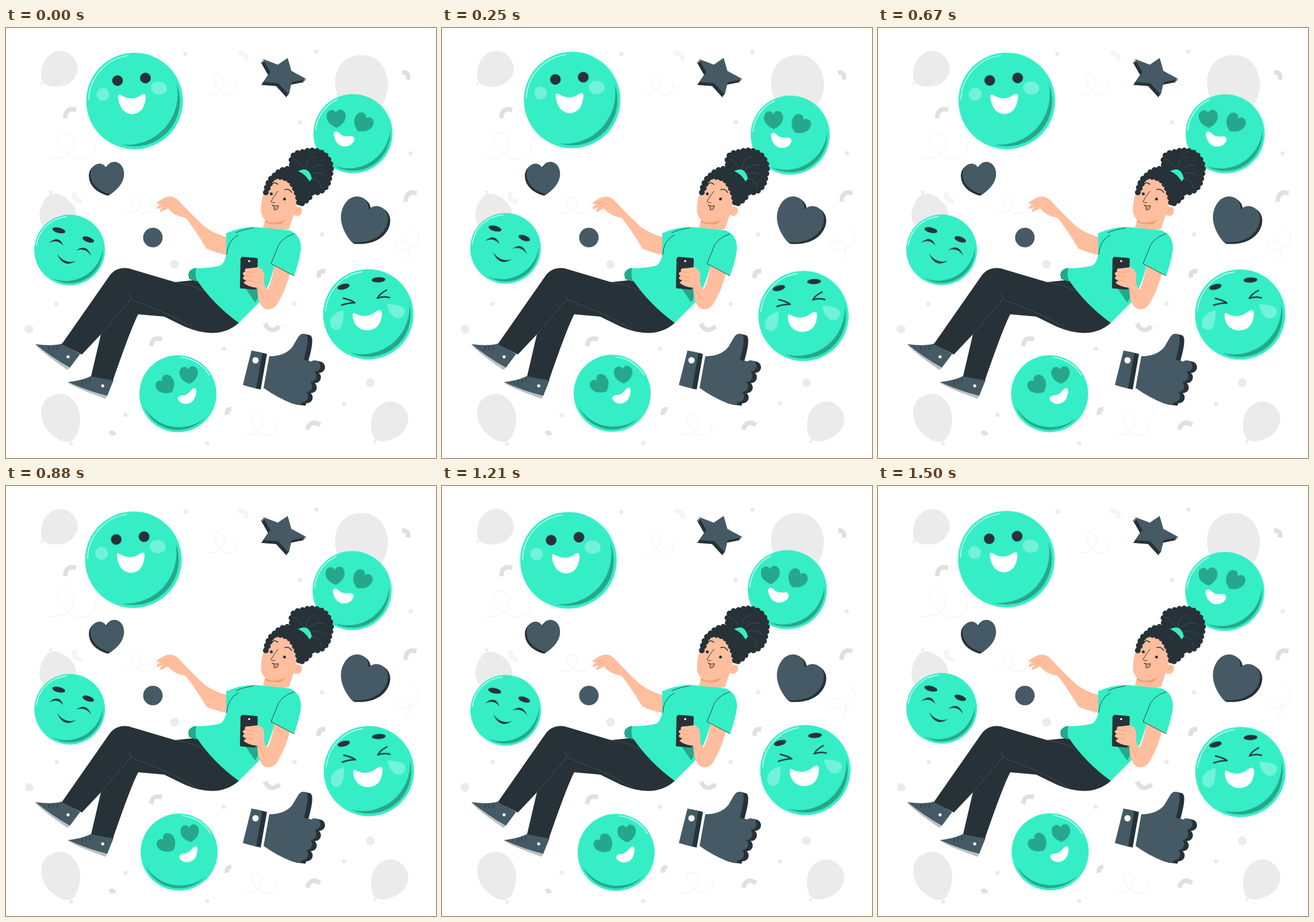
An HTML page that plays this animation: 748x748 px, repeating every 1540 ms.

```html
<!DOCTYPE html>
<html lang="en">
<head>
<meta charset="utf-8">
<title>Floating emoji</title>
<style>
  html, body { margin: 0; width: 100%; height: 100%; overflow: hidden; background: #fff; }
  svg { display: block; width: 100vw; height: 100vh; }
  .mint { fill: #35eec6; }
  .shade { fill: #26a78b; }
  .dark { fill: #263238; color: #263238; }
  .slate { fill: #455a64; color: #455a64; }
  .skin { fill: #ffbe9d; }
  .white { fill: #fff; }
  .pale { fill: #ebebeb; }
  .blush { fill: #fff; opacity: .3; }
  .line, .shine, .curl, .strip, .seam, .crease { fill: none; stroke-linecap: round; }
  .line { stroke: #263238; stroke-linejoin: round; }
  .shine { stroke: #fff; stroke-width: 1.2; }
  .curl { stroke: #ebebeb; stroke-width: .8; }
  .strip { stroke: #e0e0e0; stroke-width: 8; stroke-linecap: butt; }
  .seam { stroke: #455a64; stroke-width: .8; }
  .crease { stroke: #eb996e; stroke-width: .8; }
  /* a row of round dots along the outline makes curls and knuckles */
  .beads { stroke: currentColor; stroke-linecap: round; stroke-width: 10; stroke-dasharray: 0 8.5; }
  .knuckles { stroke-width: 20; stroke-dasharray: 0 19; }
  #faces { transform-origin: 374px 374px; animation: sway 1540ms linear -33ms infinite; }
  @keyframes sway {
    0%, 100% { transform: rotate(-.086deg); }
    25% { transform: rotate(.914deg); }
    75% { transform: rotate(-1.086deg); }
  }
</style>
</head>
<body>
<svg id="stage" viewBox="0 0 748 748"></svg>
<script>
  const path = (cls, d, more = '') => `<path class="${cls}" d="${d}" ${more}/>`;
  const dot = (cls, x, y, r) => `<circle class="${cls}" cx="${x}" cy="${y}" r="${r}"/>`;
  const oval = (cls, x, y, rx, ry, turn) =>
    `<ellipse class="${cls}" rx="${rx}" ry="${ry}" transform="translate(${x} ${y}) rotate(${turn})"/>`;
  const place = (x, y, turn, sx, sy, body) =>
    `<g transform="translate(${x} ${y}) rotate(${turn}) scale(${sx} ${sy})">${body}</g>`;
  const group = (id, ...parts) => `<g id="${id}">${parts.join('')}</g>`;

  // Dark side behind a slate front.
  const solid = (body, dx, dy) => [1, .5, 0].map(k =>
    `<g class="${k ? 'dark' : 'slate'}" transform="translate(${dx * k} ${dy * k})">${body}</g>`).join('');

  const balloon = (x, y, rx, ry, turn) => place(x, y, turn, rx, ry, path('pale',
    'M0-1C.65-1 1-.6 1-.1S.4 1 0 1-1 .4-1-.1-.65-1 0-1M0 .98L.12 1.16-.12 1.16Z'));

  const heart = (x, y, s, turn, cls = '') => place(x, y, turn, s, s, path(cls,
    'M0 1C-.6 .75-1.05 .3-1-.3C-.95-.95-.2-1.1 0-.55C.2-1.1 .95-.95 1-.3C1.05 .3 .6 .75 0 1Z'));

  const curl = (x, y, w, h, turn = 0) => place(x, y, turn, w, h, path('curl',
    'M0 .93C.3 1 .5 .75 .54 .4S.25-.15 .2 .15 .5 1.05 .76 .95 1 .6 1 .4',
    'vector-effect="non-scaling-stroke"'));

  const strip = (x, y, s, turn, more = '') =>
    place(x, y, turn, 1, 1, path('strip', `M${-s} ${s * .5}Q0 ${-s * .8} ${s} ${s * .5}`, more));

  // Five tips; each notch lies between two tips, pulled to the middle.
  const star = tips => {
    const mid = k => tips.reduce((sum, p) => sum + p[k], 0) / 5;
    const notch = (p, q, k) => mid(k) + ((p[k] + q[k]) / 2 - mid(k)) * .62;
    return path('', 'M' + tips.map((p, i) => {
      const q = tips[(i + 1) % 5];
      return `${p} ${notch(p, q, 0)},${notch(p, q, 1)}`;
    }).join('L') + 'Z');
  };

  // Disc with an inner crescent (a to b) and a thin highlight (c to d), in degrees.
  const face = (x, y, r, [a, b, c, d], ...features) => {
    const at = (deg, k) => {
      const t = deg * Math.PI / 180;
      return `${x + r * k * Math.cos(t)} ${y + r * k * Math.sin(t)}`;
    };
    const arc = (k, sweep) => `A${r * k} ${r * k} 0 0 ${sweep} `;
    return `<g>${dot('mint', x, y, r)}`
      + path('shade', `M${at(a, .94)}${arc(.94, 1)}${at(b, .94)}${arc(1.05, 0)}${at(a, .94)}Z`)
      + path('shine', `M${at(c, .95)}${arc(.95, 1)}${at(d, .95)}`)
      + features.join('') + '</g>';
  };

  const scenery = group('scenery',
    balloon(91, 73, 30, 34, 51), balloon(619, 104, 46, 57, -5), balloon(89, 322, 32, 35, 163),
    balloon(97, 679, 33, 43, -20), balloon(665, 686, 31, 37, 35),
    ...[[312, 45], [540, 41], [511, 164], [704, 218], [550, 359], [88, 480], [502, 480],
      [379, 558], [208, 673], [588, 653], [350, 722]].map(p => dot('pale', ...p, 3.8)),
    ...[[293, 411], [40, 524], [634, 617]].map(p => dot('pale', ...p, 7.6)),
    curl(353, 80, 49, 38), curl(74, 182, 81, 48), curl(207, 294, 52, 30),
    curl(416, 672, 54, 38), curl(668, 390, 55, 34, -60),
    strip(414, 47, 10, 40, 'style="stroke:#f5f5f5"'), strip(122, 297, 10, 230, 'style="stroke:#f5f5f5"'),
    strip(109, 145, 12, -38), strip(701, 290, 12, -38), strip(259, 543, 11, -32),
    strip(533, 689, 12, -20), strip(697, 81, 8, 52), strip(547, 426, 8, -45),
    strip(386, 666, 6, -55), strip(462, 523, 13, 190), strip(185, 705, 4, 20, 'stroke-width="4"'));

  const props = group('props',
    solid(star([[447, 54], [490, 52], [523, 89], [492, 116], [448, 94]]), -4, 5),
    solid(heart(177, 260, 29, -7), -3, 3),
    solid(heart(620, 336, 41, 27), 4, 3),
    dot('slate', 255.5, 364.5, 17),
    solid(path('', 'M427 561L446 565 435 627 412 621Z')
      + path('', 'M458 571Q485 571 498 555L508 538Q514 529 522 533Q529 539 518 577L537 582 513 655 497 653Q470 642 448 626Z')
      + path('beads knuckles', 'M537 588L513 647'), 8, 2),
    dot('white', 434, 578, 5.5));

  const faces = group('faces',
    face(223.6, 127, 84, [-22, 106, 182, 262],
      dot('dark', 194, 91.5, 9.3), dot('dark', 242.5, 87, 9.3),
      dot('blush', 168.5, 115.5, 11), oval('blush', 266, 104.5, 14, 11.5, 8),
      path('white', 'M195 120Q194 113 202 118Q220 128 236 116Q244 112 243 122Q240 149 219 150Q198 148 195 120Z')),
    face(603.6, 183.7, 68.8, [-5, 120, 185, 245],
      heart(574.5, 157, 16.5, -3, 'shade'), heart(621, 165, 17, 33, 'shade'),
      path('white', 'M570 184Q573 176 581 184Q587 190 601 188Q609 190 604 199Q598 207 586 206Q572 202 570 184Z')),
    face(110.7, 386.3, 61.5, [-3, 122, 188, 265],
      oval('dark', 92, 352, 11.5, 4.6, 14), oval('dark', 143, 368, 10.5, 4.6, 20),
      path('dark', 'M75 374Q92 359 100 379Q89 366 75 374ZM122 387Q140 374 148 396Q138 381 122 387ZM89 393Q102 412 122 405Q100 419 89 393Z')),
    face(630.2, 498, 78.5, [-14, 115, 185, 262],
      oval('dark', 587, 450, 11, 4.6, -15), oval('dark', 648, 438, 12, 4.4, -3),
      path('line', 'M587 470Q600 473 607 478Q595 478 584 482M662 456Q650 462 646 470Q656 466 667 469', 'stroke-width="2.4"'),
      path('blush', 'M587 491Q588 525 574 525Q562 523 564 509Q569 495 587 491ZM663 480Q694 481 694 492Q692 508 677 504Q666 498 663 480Z'),
      path('white', 'M603 500Q603 492 610 498Q628 506 644 493Q654 486 654 498Q652 525 628 526Q605 524 603 500Z')),
    face(299, 636.3, 67, [42, 158, 275, 330],
      heart(278, 621, 16.5, -42, 'shade'), heart(318, 603, 16, -5, 'shade'),
      path('white', 'M299 644Q300 639 310 639Q317 637 323 629Q331 622 331 633Q329 654 311 654Q300 652 299 644Z')));

  const shoe = 'M0 0Q30 4 46-1L78 17 60 41Q28 23 0 0Z';
  const sole = 'M0 0Q4 9 56 45L60 41Q28 23 0 0Z';
  const shoes = [[51, 550, 0], [107.5, 616, -15]].map(([x, y, turn]) => place(x, y, turn, 1, 1,
    path('slate', shoe) + path('', sole, 'fill="#b9c0c3"') + dot('pale', 57, 22, 2.8)
    + path('line', 'M25 3l-2 7m9-7l-2 7m9-7l-2 7'))).join('');

  const body = group('body',
    path('skin', 'M385 364Q360 357 345 345Q328 330 300 300Q289 289 274 296L263 303Q260 308 270 306Q259 312 263 315L274 311Q265 317 269 320L282 314Q292 327 312 330Q325 345 349 384Q365 391 385 395Z'),
    path('crease', 'M270 306l10-4m-5 8l8-4'),
    shoes,
    path('dark', 'M333 438L405 513Q370 544 312 520L275 502 230 498Q217 523 186 613L148 606 165 533 132 568 97 550 178 434Q190 415 213 418L294 442Z'),
    path('seam', 'M165 533L217 472 272 494Q300 505 330 525M217 472l-3-10M294 442Q325 447 345 458'),
    path('skin', 'M452 330L447 347Q470 354 492 350L503 318Z'),
    path('', 'M451 333Q468 341 487 333L479 341Q463 343 450 338Z', 'fill="#f3a077"'),
    path('mint', 'M383 357Q408 346 433 346L493 352Q513 360 513 382Q512 400 501 431L467 414Q458 450 440 478L405 513Q362 482 333 440L322 438Q312 424 326 418Q356 418 374 413Q383 404 383 392Z'),
    path('shade', 'M331 417Q312 422 319 437L332 441Q328 428 331 417ZM417 453L433 477Q441 472 437 448Z'),
    path('line', 'M384 394Q385 370 404 360M400 356Q414 350 430 348', 'stroke-width=".9"'),
    path('dark', 'M411 398L435 400Q438 400 438 403L436 452Q435 455 432 455L409 453Q406 453 407 449L408 401Z'),
    dot('white', 423, 405.5, 1.8),
    path('skin', 'M467 411L494 426Q487 455 472 480Q465 491 453 489Q438 485 437 452Q420 450 413 443L418 439Q408 436 415 431Q408 426 416 424Q413 417 423 418L440 416Q451 422 449 436Q447 447 455 455Q463 440 467 411Z'),
    path('crease', 'M416 424l15 2m-16 5l15 2m-12 6l11 1M437 452Q447 461 448 470'),
    path('mint', 'M470 388L461 410 501 431Q512 400 513 382L497 365Z'),
    path('line', 'M501 358Q475 366 470 388L461 410 501 431', 'stroke-width=".9"'));

  const head = group('head',
    path('dark beads', 'M497 238Q493 218 515 216Q542 208 556 222Q570 238 563 258Q560 282 542 286Q524 290 514 266Z'),
    path('seam', 'M522 246Q520 228 538 224M527 247Q538 235 553 239M530 254Q546 248 558 259M532 262Q546 262 549 279M516 243Q510 230 499 228'),
    path('skin', 'M453 268Q441 308 444 322Q449 341 470 338Q489 335 498 324Q512 332 515 318Q515 309 505 311L510 270 490 250Z'),
    path('dark beads', 'M452 286Q455 264 468 256Q480 243 500 245Q526 252 532 278Q534 298 510 307Q507 280 493 265Q478 256 464 260Z'),
    path('mint', 'M508 249Q527 239 532 262L528 267Q521 254 508 249Z'),
    dot('dark', 461.5, 288.5, 2.5), dot('dark', 484.5, 297.5, 2.5),
    path('line', 'M463 271Q468 267 473 272M485 281Q492 279 497 286', 'stroke-width="1.6"'),
    path('line', 'M473 284Q465 294 461 302Q462 304 468 304'),
    path('line', 'M463 308Q468 311 474 309Q473 318 466 316Q468 312 463 308Z', 'style="fill:#eb996e"'),
    path('crease', 'M504 321Q505 315 511 315'));

  document.getElementById('stage').innerHTML = scenery + props + faces + body + head;
</script>
</body>
</html>
```
